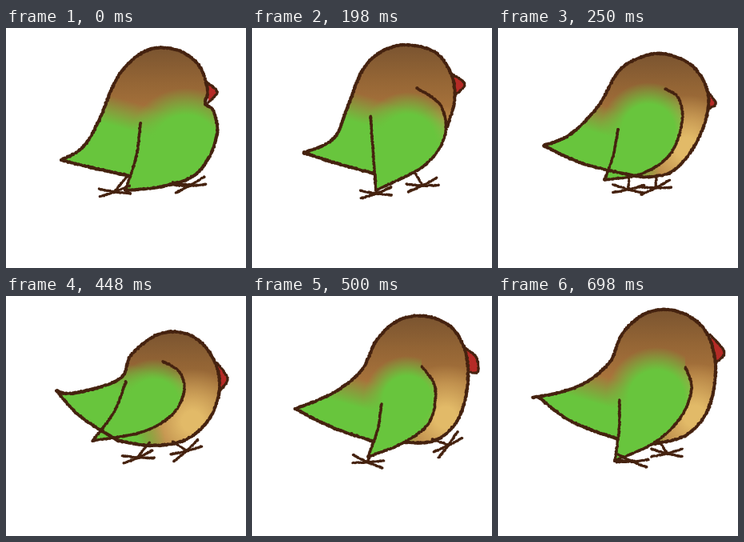
Write an HTML page with a canvas that moves like this. It is 300 by 300 pixels and loops after 750 ms.

```html
<!DOCTYPE html>
<html lang="en">
<head>
<meta charset="utf-8">
<title>Little bird</title>
<style>
  html, body { margin: 0; width: 100%; height: 100%; overflow: hidden; background: #fff; }
  canvas { display: block; width: 300px; height: 300px; }
</style>
</head>
<body>
<canvas id="stage" width="300" height="300"></canvas>
<script>
const ctx = document.getElementById('stage').getContext('2d');
const INK = '#45220f', RED = '#b52b26';
const GREEN = '104,197,61', YELLOW = '226,186,104';

// Key points of each pose.
// back: tail tip over the head to the belly; tail: its underside
// wing: front edge to the tip; edge: from the tip up; dome: soft green (x y r)
// feet: hip and sole; tilts: lean of each foot in degrees
const poses = [
  {
    back: '69,165 96,149 116,116 137,66 160,38 187,25 218,29 242,48 252,78 249,94 259,103 264,130 253,163 231,187 190,199 149,203',
    tail: '69,165 105,174 155,185',
    edge: '149,203 163,160 168,119',
    beak: '251,68 264,80 253,93',
    feet: ['151,186 136,204', '208,193 230,196'], tilts: [-6, -15],
    dome: [225, 150, 75]
  },
  {
    back: '65,156 102,138 119,100 138,53 161,30 193,21 230,31 250,60 253,92 244,123',
    tail: '65,156 105,169 153,182',
    wing: '206,75 236,97 241,135 215,172 155,203',
    edge: '155,203 152,165 148,110',
    beak: '249,57 266,70 254,84',
    feet: ['154,185 155,206', '203,180 213,196'], tilts: [-6, -12],
    dome: [195, 142, 62]
  },
  {
    back: '57,147 90,133 125,98 150,55 175,38 205,32 240,45 260,73 262,105 247,145 220,178 190,186 165,184',
    tail: '57,147 105,169 165,184',
    wing: '209,76 226,88 230,118 215,158 180,182 133,190',
    edge: '133,190 144,160 150,126',
    beak: '260,77 272,94 263,101',
    feet: ['164,187 163,201', '198,186 197,199'], tilts: [1, -13],
    dome: [188, 128, 60]
  },
  {
    back: '63,118 80,122 120,113 146,100 157,73 190,48 225,47 252,67 267,105 258,147 228,178 185,187 140,181',
    tail: '63,118 92,150 140,181',
    wing: '196,82 216,94 223,118 208,148 170,170 108,181',
    edge: '108,181 135,145 150,107',
    beak: '263,83 277,103 268,118',
    feet: ['179,183 165,201', '208,182 225,193'], tilts: [-10, -28],
    dome: [185, 135, 56]
  },
  {
    back: '54,141 100,122 136,94 156,55 182,31 215,25 248,38 267,70 269,115 256,157 228,181 190,183',
    tail: '54,141 100,164 152,182',
    wing: '212,88 229,115 222,157 190,183 145,201',
    edge: '145,201 157,167 162,135',
    beak: '263,63 280,76 282,95 271,95',
    feet: ['147,199 145,207', '225,179 245,186'], tilts: [10, -40],
    dome: [194, 130, 55]
  },
  {
    back: '43,127 75,121 110,108 140,82 155,48 180,24 210,17 242,27 264,52 272,95 262,143 235,174 195,185',
    tail: '50,126 92,157 150,179',
    wing: '234,89 242,115 229,151 196,183 146,206',
    edge: '146,206 151,170 152,130',
    beak: '265,48 283,70 273,83',
    feet: ['147,206 168,206', '203,184 211,196'], tilts: [10, 0],
    dome: [198, 128, 64]
  }
];

// Smooth curve through the given points, sampled about every 0.7 px
function curve(text) {
  if (!text) return [];
  const p = text.split(' ').map(s => s.split(',').map(Number));
  const out = [];
  for (let i = 0; i < p.length - 1; i++) {
    const a = p[i - 1] || p[i], b = p[i], c = p[i + 1], d = p[i + 2] || c;
    const n = Math.ceil(Math.hypot(c[0] - b[0], c[1] - b[1]) / 0.7);
    for (let k = 0; k < n; k++) {
      const t = k / n;
      out.push([0, 1].map(j => b[j] + 0.5 * t * (c[j] - a[j]
        + t * (2 * a[j] - 5 * b[j] + 4 * c[j] - d[j]
        + t * (3 * (b[j] - c[j]) + d[j] - a[j])))));
    }
  }
  out.push(p[p.length - 1]);
  return out;
}

function shape(points) {
  const path = new Path2D();
  points.forEach(([x, y]) => path.lineTo(x, y));
  path.closePath();
  return path;
}

let seed = 1;
function rnd() {
  seed = (seed * 16807) % 2147483647;
  return seed / 2147483647;
}

// Crayon stroke: small overlapping dabs with a ragged edge
function crayon(points, width) {
  ctx.fillStyle = INK;
  ctx.beginPath();
  for (const [x, y] of points) {
    const r = width * (0.36 + 0.2 * rnd());
    const px = x + rnd() - 0.5, py = y + rnd() - 0.5;
    ctx.moveTo(px + r, py);
    ctx.arc(px, py, r, 0, 7);
  }
  ctx.fill();
}

function paint(gradient, ...colors) {
  colors.forEach((c, i) => gradient.addColorStop(i / (colors.length - 1), c));
  ctx.fillStyle = gradient;
  ctx.fillRect(0, 0, 300, 300);
}

function glow(x, y, r, rgb, core) {
  paint(ctx.createRadialGradient(x, y, r * core, x, y, r), `rgb(${rgb})`, `rgba(${rgb},0)`);
}

function plumage(top, [x, y]) {
  paint(ctx.createLinearGradient(0, top, 0, top + 85), '#7a5430', '#946535', '#a9743c');
  glow(x + 48, y + 22, 66, YELLOW, 0.2);
  glow(x - 35, y + 50, 50, GREEN, 0.3);
}

function green([ex, ey], [x, y, r]) {
  paint(ctx.createLinearGradient(ex, ey - 24, ex - 10, ey + 10), `rgba(${GREEN},0)`, `rgb(${GREEN})`);
  glow(x, y, r, GREEN, 0.55);
}

// A leg and two long toes crossing at the sole
function drawFoot(text, tilt) {
  const leg = curve(text), [x, y] = leg[leg.length - 1];
  crayon(leg, 3.3);
  for (const spread of [-14, 14]) {
    const a = (tilt + spread) * Math.PI / 180;
    const dx = 20 * Math.cos(a), dy = 20 * Math.sin(a);
    crayon(curve(`${x - dx},${y - dy} ${x},${y + 1} ${x + dx},${y + dy}`), 3.3);
  }
}

function drawBird(pose, index) {
  seed = 101 + index * 977;
  const [back, tail, wing, edge, beak] =
    ['back', 'tail', 'wing', 'edge', 'beak'].map(name => curve(pose[name]));
  const top = Math.min(...back.map(p => p[1]));
  const body = shape([...back, ...tail.slice().reverse()]);
  if (wing.length) body.addPath(shape([...wing, ...edge]));

  ctx.fillStyle = '#fff';
  ctx.fillRect(0, 0, 300, 300);
  ctx.fillStyle = RED;
  ctx.fill(shape(beak));
  crayon(beak, 3.2);

  ctx.save();
  ctx.clip(body);
  plumage(top, pose.dome);
  if (wing.length) ctx.clip(shape([...wing, [0, 300], [0, 0], [wing[0][0], 0]]));
  green(edge[edge.length - 1], pose.dome);
  ctx.restore();

  pose.feet.forEach((foot, i) => drawFoot(foot, pose.tilts[i]));
  [back, tail].forEach(line => crayon(line, 4.1));
  [wing, edge].forEach(line => crayon(line, 3.6));
}

// Poses change in pairs of 120 and 130 ms
let shown = -1;
function tick() {
  const t = performance.now() % 750;
  const i = 2 * Math.floor(t / 250) + (t % 250 >= 120 ? 1 : 0);
  if (i !== shown) drawBird(poses[shown = i], i);
  requestAnimationFrame(tick);
}
tick();
</script>
</body>
</html>
```
